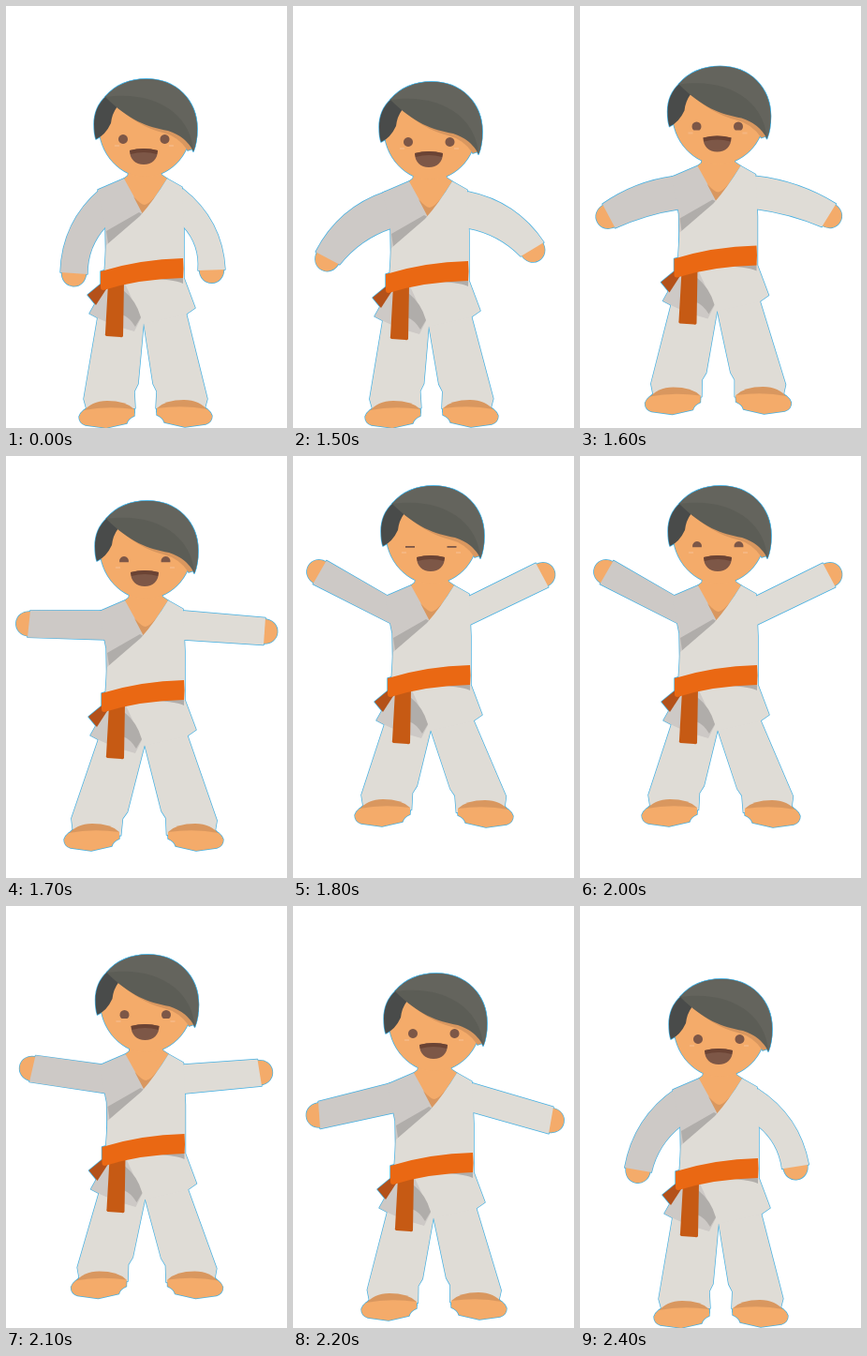
Recreate the animation shown at these times as an HTML page with a canvas. Size 300 by 450 pixels, loop 2500 ms.

```html
<!DOCTYPE html>
<html>
<head>
<meta charset="utf-8">
<style>
  html, body { margin: 0; width: 100%; height: 100%; overflow: hidden; background: #fff; }
  canvas { display: block; }
</style>
</head>
<body>
<canvas id="stage" width="300" height="450"></canvas>
<script>
const ctx = document.getElementById('stage').getContext('2d');
const SKIN = '#f4ab6a', TAN = '#d9975f', LIGHT = '#dfdcd6', GREY = '#cdc9c6',
      SHADE = '#b0adaa', BROWN = '#7d5747', EDGE = '#45b0e2';

// body x, y | left foot dx, dy | right foot dx, dy | arm bow, eye opening |
// left cuff x, y, angle | right cuff x, y, mirrored angle
const stand = [0, 0, 0, 0, 0, 0, 22, 1, 72.5, 285, 4, 219.5, 281.5, 2];
const crouch = [-2, 3, -1, 0, -1, 0, 20, 1, 37, 269, 28, 255.5, 259.5, 31];
const rise = [1, -30, -16, -29, 12, -28, 0, .5, 24.5, 179, 96, 276, 187, 86];
const high = [0, -46, -12, -55, 15, -53, 0, 0, 28.5, 124, 120, 266, 127, 118];
const apex = [0, -58, -11, -67, 14, -65, 0, 0, 34, 103, 127, 260, 107, 125];
const land = [3, -6, -5, -8, 8, -8, 0, 1, 28, 223, 86, 275.5, 228.5, 80];
const settle = [1, 0, 1, 0, 2, 0, 21, 1, 62, 281.5, 10, 230, 278, 9];

const mid = (a, b) => a.map((v, i) => (v + b[i]) / 2);
const fall = high.map((v, i) => i === 7 ? .5 : v);
const steps = [crouch, mid(crouch, rise), rise, high, apex, fall,
               mid(fall, land), land, mid(land, settle), settle];

let parts;
const add = (color, d, x = 0, y = 0) => parts.push([color, new Path2D(d), x, y]);

function leg(side, x, y, fx, fy) {
  const flip = px => side > 0 ? px : 298 - px;
  const cx = flip(107) + fx, cy = 436 + fy;
  const turn = (x - fx) * .009, c = Math.cos(turn), s = Math.sin(turn);
  const hem = [[-24, -17], [-21, -6], [31, -7], [30, -25], [34, -33]].map(([px, py]) => {
    px *= side;
    return [cx + px * c - py * s, cy + px * s + py * c];
  });
  const hip = side > 0 ? [98 + x, 331 + y] : [192 + x, 326 + y];
  add(LIGHT, 'M' + [hip, ...hem, [147 + x, 338 + y], [147 + x, 305 + y], [hip[0], 308 + y]].join('L') + 'Z');
}

function foot(side, fx, fy) {
  // Mirror the outline for the right foot
  const m = d => d.replace(/(\d+),(\d+)/g, (_, px, py) =>
    `${side > 0 ? px : 298 - px},${side > 0 ? py : py - 1}`);
  add(TAN, m('M82,433Q91,421 108,421Q128,421 137,430L137,434Z'), fx, fy);
  add(SKIN, m('M83,431Q108,426 137,430L137,437Q130,440 129,445L107,450L85,447Q78,445 78,438Q79,434 83,431Z'), fx, fy);
}

function arm(side, x, y, bow, cx, cy, deg) {
  const t = deg * Math.PI / 180, ux = side * Math.cos(t), uy = Math.sin(t);
  const nx = -side * uy, ny = side * ux;
  const at = (u, n) => [cx + ux * u + nx * n, cy + uy * u + ny * n];
  const bend = (p, q, k) => {
    const dx = q[0] - p[0], dy = q[1] - p[1], len = Math.hypot(dx, dy);
    return [(p[0] + q[0]) / 2 - side * dy / len * k, (p[1] + q[1]) / 2 + side * dx / len * k];
  };
  const top = [(side > 0 ? 101 : 189) + x, 195 + y];
  const pit = [(side > 0 ? 107 : 189) + x, 226 + bow * .4 + y];
  const a = at(-14.5, 0), b = at(14.5, 0);
  add(SKIN, `M${at(-13, -2)}C${at(-14, 19)} ${at(14, 19)} ${at(13, -2)}Z`);
  add(side > 0 ? GREY : LIGHT,
    `M${top}Q${bend(top, a, bow)} ${a}L${b}Q${bend(pit, b, bow / 2)} ${pit}L${147 + x},${215 + y}Z`);
}

function torso(x, y) {
  const p = (color, d) => add(color, d, x, y);
  p(GREY, 'M126,184L98,196L106,235L107,290L150,290L150,205Z');
  p(SKIN, 'M132,172L130,181L126,184L147,222L172,184L166,180L164,172Z');
  p(TAN, 'M136,203Q144,212 148,212Q153,211 160,202L147,224Z');
  p(SHADE, 'M107,240L142,220L150,224L110,260Z');
  p(LIGHT, 'M172,184L188,193L190,238L190,290L202,322L192,329L147,339L126,320L104,300L107,255L143,224Q158,207 172,184Z');
  p(SHADE, 'M150,289L189,288L189,296Q178,291 150,291Z');
  p(GREY, 'M103,303L89,328Q110,340 137,347L144,333L127,296Z');
  p(SHADE, 'M125,303Q139,314 144,332L138,342Q132,332 124,329Z');
  p('#b4511a', 'M104,294L87,308L96,319L107,302Z');
  p('#c65a14', 'M109,296L126,294L125,352Q124,354 122,353L107,352Q105,351 106,349Z');
  p('#ea6813', 'M101,283Q143,270 189,269Q190,280 189,290Q142,291 104,303Q101,303 101,300Z');
}

function head(x, y, lid) {
  const p = (color, d) => add(color, d, x, y);
  p(SKIN, 'M99,125C99,80 197,80 197,130C197,162 172,182 148,182C124,182 99,160 99,125Z');
  p(TAN, 'M117,106Q140,128 167,135Q184,139 194,154L200,152L185,120Z');
  p('#494b4a', 'M107,96Q94,108 94,126Q94,136 96,142Q106,138 112,125Q113,115 119,107Z');
  p('#5c5d56', 'M106,97C117,84 133,78 150,78C182,78 204,101 204,131Q204,145 200,155Q192,139 173,133C151,129 131,122 106,97Z');
  p('#64645d', 'M106,97C117,84 133,78 150,78C182,78 204,101 204,131Q204,145 200,155C198,117 161,89 106,97Z');
  p('#f6b680', 'M116,148h5v2h-5ZM174,148h5v2h-5Z');
  for (const ex of [125, 169.5]) {
    if (lid < .25) p(BROWN, `M${ex - 5},142h10v1.8h-10Z`);
    else {
      const c = (lid - .5) * Math.PI * .99 + .5 * (1 - lid);
      const w = 5 * Math.cos(c), h = 142 + 5 * Math.sin(c);
      p(BROWN, `M${ex - w},${h}A5,5 0 1 1 ${ex + w},${h}Z`);
    }
  }
  p(BROWN, 'M132,154Q147,150 162,154C162,163 156,169 147,169C138,169 132,163 132,154Z');
  p('#6b4334', 'M132,154Q147,150 162,154L161,158Q147,154 133,158Z');
}

function draw([x, y, lx, ly, rx, ry, bow, lid, ...cuffs]) {
  parts = [];
  leg(1, x, y, lx, ly);
  leg(-1, x, y, rx, ry);
  foot(1, lx, ly);
  foot(-1, rx, ry);
  arm(1, x, y, bow, ...cuffs.slice(0, 3));
  arm(-1, x, y, bow, ...cuffs.slice(3));
  torso(x, y);
  head(x, y, lid);

  ctx.clearRect(0, 0, 300, 450);
  ctx.strokeStyle = EDGE;
  ctx.lineWidth = 1.4;
  ctx.lineJoin = 'round';
  // Strokes first, so that only the outer contour stays visible
  for (const mode of ['stroke', 'fill']) {
    for (const [color, path, dx, dy] of parts) {
      ctx.setTransform(1, 0, 0, 1, dx, dy);
      ctx.fillStyle = color;
      ctx[mode](path);
    }
  }
  ctx.setTransform(1, 0, 0, 1, 0, 0);
}

function tick() {
  const t = performance.now() % 2500;
  draw(t < 1500 ? stand : steps[Math.floor((t - 1500) / 100)]);
  requestAnimationFrame(tick);
}
tick();
</script>
</body>
</html>
```
